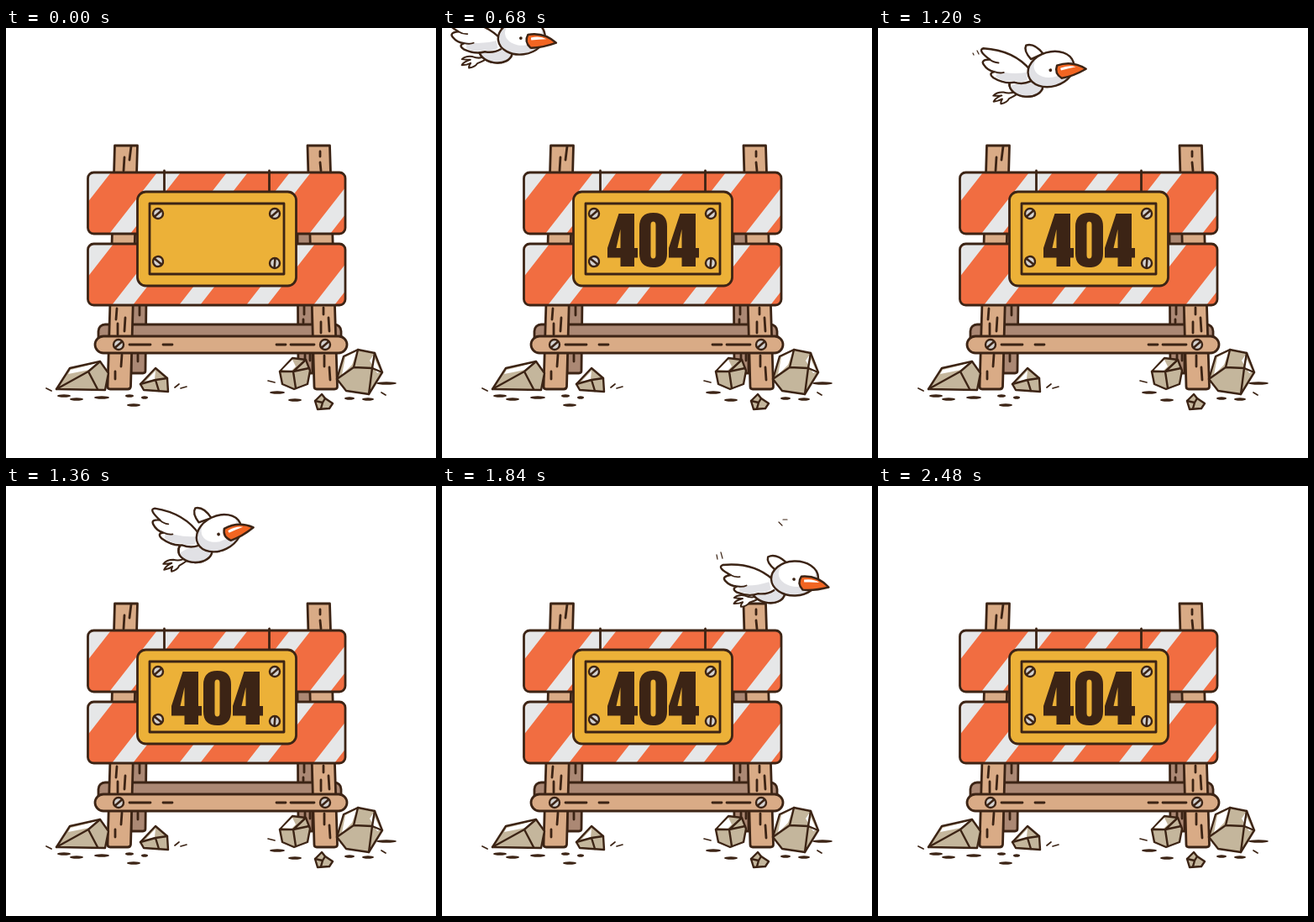
Write an HTML page that moves like this. It is 512 by 512 pixels and loops after 2880 ms.

```html
<!DOCTYPE html>
<html lang="en">
<head>
<meta charset="utf-8">
<title>404</title>
<style>
html, body { margin: 0; width: 100%; height: 100%; overflow: hidden; background: #fff; }
svg { display: block; }
.stage { width: 100vw; height: 100vh; }
.ln { fill: none; }
.wood { fill: #d9ab86; }
.back { fill: #ab8874; }
.rock { fill: #c4b69c; }
.lit { fill: #fff; stroke: none; }
.shade { fill: #e1e1e5; stroke: none; }
.dark { fill: #3c2415; stroke: none; }
</style>
</head>
<body>
<svg class="stage" viewBox="0 0 512 512" stroke="#3c2415" stroke-width="2.8" stroke-linejoin="round" stroke-linecap="round">
<defs>
  <clipPath id="top"><rect x="97.5" y="172" width="306.5" height="73" rx="7"/></clipPath>
  <clipPath id="low"><rect x="97.5" y="257" width="306.5" height="73" rx="7"/></clipPath>
  <clipPath id="belly"><ellipse cx="-28" cy="21" rx="20" ry="14"/></clipPath>
  <clipPath id="face"><ellipse rx="28" ry="20.5"/></clipPath>
  <g id="screw"><circle r="6" fill="#d3d1d0" stroke-width="2.4"/><path d="M-4 3.4L4-3.4" stroke-width="2.6"/></g>
</defs>

<!-- frame -->
<g class="back">
  <path d="M149 240H168L166 408Q166 411 163 411H149ZM347 240H365V411H351Q348 411 348 408Z"/>
  <rect x="110" y="353" width="289" height="24" rx="8"/>
  <path class="ln" d="M159 331V342M157 389V397M355 331V341M354 347V351M356 389V404M362 389V396"/>
</g>
<g class="wood">
  <path d="M129.5 140H156.5L148.5 427Q148 430 145 430H124Q121 430 121 427Z"/>
  <path d="M359 140H385.5L394.5 427Q394.5 430 391 430H370Q367 430 367 427Z"/>
  <path class="ln" d="M141 154L140 170M149 141L147 157M374 147V153M374 160L375 170M132 334L131 347M142 345L141 361M133 352V365M138 389L137 403M130 409V418M378 333V341M384 345L385 361M375 350V363M379 390V403M385 404L386 419"/>
  <rect x="106" y="367" width="300" height="20" rx="10"/>
  <path class="ln" d="M147 377H172M187 377H198M322 377H333M339 377H367"/>
</g>

<!-- boards -->
<g id="boards"></g>
<path d="M188.5 170V195M313.5 170V195"/>
<rect x="156.5" y="195" width="189" height="112" rx="10" fill="#ecb138"/>
<rect x="171" y="209" width="160" height="84" fill="#ecb138"/>
<use href="#screw" x="134" y="377"/><use href="#screw" x="380" y="377"/>
<use href="#screw" x="181" y="221"/><use href="#screw" x="320" y="221"/>
<use href="#screw" transform="translate(181 278) rotate(80)"/>
<use href="#screw" transform="translate(320 280) rotate(-45)"/>
<g id="code" class="dark" fill-rule="evenodd" role="img" aria-label="404">
  <path id="four" d="M-41-31.5H-22.5V9.5H-18.5V21H-22.5V31.5H-39V21H-54.5V9.5ZM-39 9.5V-13L-44 9.5Z"/>
  <use href="#four" x="73"/>
  <path d="M-16.5-16Q-16.5-32.5 0-32.5T16.5-16V16Q16.5 32.5 0 32.5T-16.5 16ZM-3-18V18Q-3 22 0 22T3 18V-18Q3-22 0-22T-3-18Z"/>
</g>

<!-- rubble -->
<g class="rock" stroke-width="2.4">
  <path d="M60 430L76 405L112 397L122 411L118 431Z"/>
  <path class="lit" d="M77 407L109 399L99 407L74 412Z"/>
  <path class="ln" d="M60 430L98 409L112 397M98 409L109 430"/>
  <path d="M160 424L178 405L192 417L193 433L164 431Z"/>
  <path class="lit" d="M166 421L178 408L177 418Z"/>
  <path class="ln" d="M160 424L178 419L192 417M178 419L182 432"/>
  <path d="M326 409L341 393L357 395L362 408L359 424L343 430L329 424Z"/>
  <path class="lit" d="M329 407L341 395L345 403L340 408Z"/>
  <path class="ln" d="M326 409L342 409L361 405M342 409L357 395M342 409L345 429"/>
  <path d="M394 418L402 391L419 383L439 387L448 410L432 436L405 432Z"/>
  <path class="lit" d="M404 392L418 385L412 401L400 413ZM437 390L446 409L442 411L433 396Z"/>
  <path class="ln" d="M394 418L414 404L419 383M414 404L436 405L439 387M436 405L448 410M436 405L432 436"/>
  <path d="M368 444L376 436L380 441L389 447L385 453L371 454Z"/>
  <path class="ln" d="M368 444L377 446L380 441M377 446L375 453"/>
</g>
<g id="dust" class="dark"></g>
<path class="ln" stroke-width="1.7" d="M48 429L54 432M201 428L206 424M208 429L215 427M312 420L320 422M447 434L452 437"/>

<!-- bird -->
<g id="bird" fill="#fff" stroke-width="2.4">
  <g id="marks" class="ln" stroke-width="1.2">
    <path id="tick1"/><path id="tick2"/>
  </g>
  <path id="far" d="M-24-13Q-32-24-28-30Q-18-32-9-18Z"/>
  <g id="body">
    <path stroke-width="2" d="M-39 29Q-45 34-54 32Q-62 32-66 37Q-60 37-56 36Q-64 40-65 44Q-59 43-55 40Q-57 44-56 46Q-49 44-47 39Q-42 36-38 33Z"/>
    <ellipse cx="-28" cy="21" rx="20" ry="14"/>
    <ellipse class="shade" cx="-24" cy="32" rx="26" ry="15" clip-path="url(#belly)"/>
    <ellipse class="ln" cx="-28" cy="21" rx="20" ry="14"/>
  </g>
  <g id="wing">
    <path d="M-23 2Q-40-24-76-30Q-84-29-70-16Q-81-17-78-11Q-74-3-66-1Q-74 0-68 6Q-56 15-44 14Q-34 18-25 15"/>
    <path class="shade" d="M-68-4Q-50 5-28 4V13Q-36 16-44 12Q-57 13-65 5Q-62 2-68-4Z"/>
    <path class="ln" stroke-width="1.8" d="M-70-16Q-66-12-60-11M-66-1Q-60 2-55 1"/>
  </g>
  <g id="head">
    <g clip-path="url(#face)">
      <ellipse class="shade" rx="28" ry="20.5"/>
      <ellipse class="lit" cx="3" cy="-6" rx="22" ry="16"/>
    </g>
    <ellipse class="ln" rx="28" ry="20.5"/>
    <circle class="dark" cx="-1" cy="1" r="1.9"/>
    <path fill="#f26522" d="M8-2Q27-3 40 12Q22 16 9 14Q2 6 8-2Z"/>
    <path class="lit" d="M11 2Q22 1 29 6Q20 5 11 5Z"/>
  </g>
  <path id="puff" class="ln" stroke-width="1.2" d="M-14-70H-9M-19-67L-15-63"/>
</g>
</svg>
<script>
const $ = id => document.getElementById(id);
const set = (id, value) => $(id).setAttribute('transform', value);

// A plank clips its slanted white stripes, which repeat every 80 px.
function plank(y, left, right, shift) {
  let d = '';
  for (let x = 103 + shift - left; x < 390; x += 80) d += `M${x} 0h25l-57 73h-25Z`;
  return `<svg x="${left}" y="${y}" width="${right - left}" height="73">` +
    `<path d="${d}" fill="#e6e7e8" stroke="none"/></svg>`;
}
function board(clip, y, planks) {
  const box = `x="97.5" y="${y}" width="306.5" height="73" rx="7"`;
  return `<rect ${box} fill="#f16d41" stroke="none"/><g clip-path="url(#${clip})">` +
    planks.map(p => plank(y, ...p)).join('') + `</g><rect ${box} fill="none"/>`;
}
$('boards').innerHTML =
  board('top', 172, [[97, 188, -3], [188, 313, 0], [313, 405, -5]]) +
  board('low', 257, [[97, 405, 0]]);

$('dust').innerHTML = [
  [69, 438, 8], [84, 442, 8], [114, 440, 9], [147, 438, 5], [165, 440, 4], [152, 449, 8],
  [323, 434, 9], [344, 443, 8], [409, 441, 6], [431, 442, 7], [453, 423, 12]
].map(([x, y, r]) => `<ellipse cx="${x}" cy="${y}" rx="${r}" ry="1.8"/>`).join('');

// Flight of the head: time, x, y
const path = [[440, 74, -75], [600, 86, -16], [760, 106, 33], [880, 132, 44], [1200, 206, 49],
  [1520, 306, 68], [1840, 420, 110], [2160, 515, 133], [2440, 590, 128], [2520, 612, 126]];

function along(t, k) {
  let i = 0;
  while (i < path.length - 2 && path[i + 1][0] <= t) i++;
  const slope = n => {
    const a = path[Math.max(n - 1, 0)], b = path[Math.min(n + 1, path.length - 1)];
    return (b[k] - a[k]) / (b[0] - a[0]);
  };
  const a = path[i], b = path[i + 1], h = b[0] - a[0], u = (t - a[0]) / h, v = 1 - u;
  return v * v * (1 + 2 * u) * a[k] + u * u * (3 - 2 * u) * b[k] +
    h * u * v * (v * slope(i) - u * slope(i + 1));
}

function codeScale(t) {
  if (t < 240) return 0;
  if (t <= 440) return 1.11 * Math.sin((t - 200) / 240 * Math.PI / 2);
  const u = Math.min((t - 440) / 200, 1);
  return 1.11 - 0.11 * u * u * (3 - 2 * u);
}

function draw(now) {
  const t = Math.floor(now % 2880 / 40) * 40;
  set('code', `translate(251.5 252.5) scale(${codeScale(t)})`);

  const flying = t >= 480 && t < 2480;
  $('bird').style.display = flying ? '' : 'none';
  if (!flying) return;
  // 1: level with lowered wings, 0: nose and wings up
  const p = 0.5 + 0.5 * Math.cos((t - 880) / 1077 * 2 * Math.PI);
  set('bird', `translate(${along(t, 1)} ${along(t, 2)})`);
  set('body', `rotate(${13 * p})`);
  set('head', `rotate(${28 * p - 27})`);
  set('wing', `rotate(${-17 * p} -28 14)`);
  set('far', `rotate(${-18 * p} -14 -14)`);
  const len = 2 + 6 * p, y = -16 - 17 * p;
  $('tick1').setAttribute('d', `M-93 ${y + 3}l1 ${len - 2}`);
  $('tick2').setAttribute('d', `M-88 ${y}l2 ${len}`);
  $('marks').style.display = p > 0.2 ? '' : 'none';
  $('puff').style.display = t >= 1800 && t < 1920 ? '' : 'none';
}

const start = performance.now();
function tick() {
  draw(performance.now() - start);
  requestAnimationFrame(tick);
}
tick();
</script>
</body>
</html>
```
